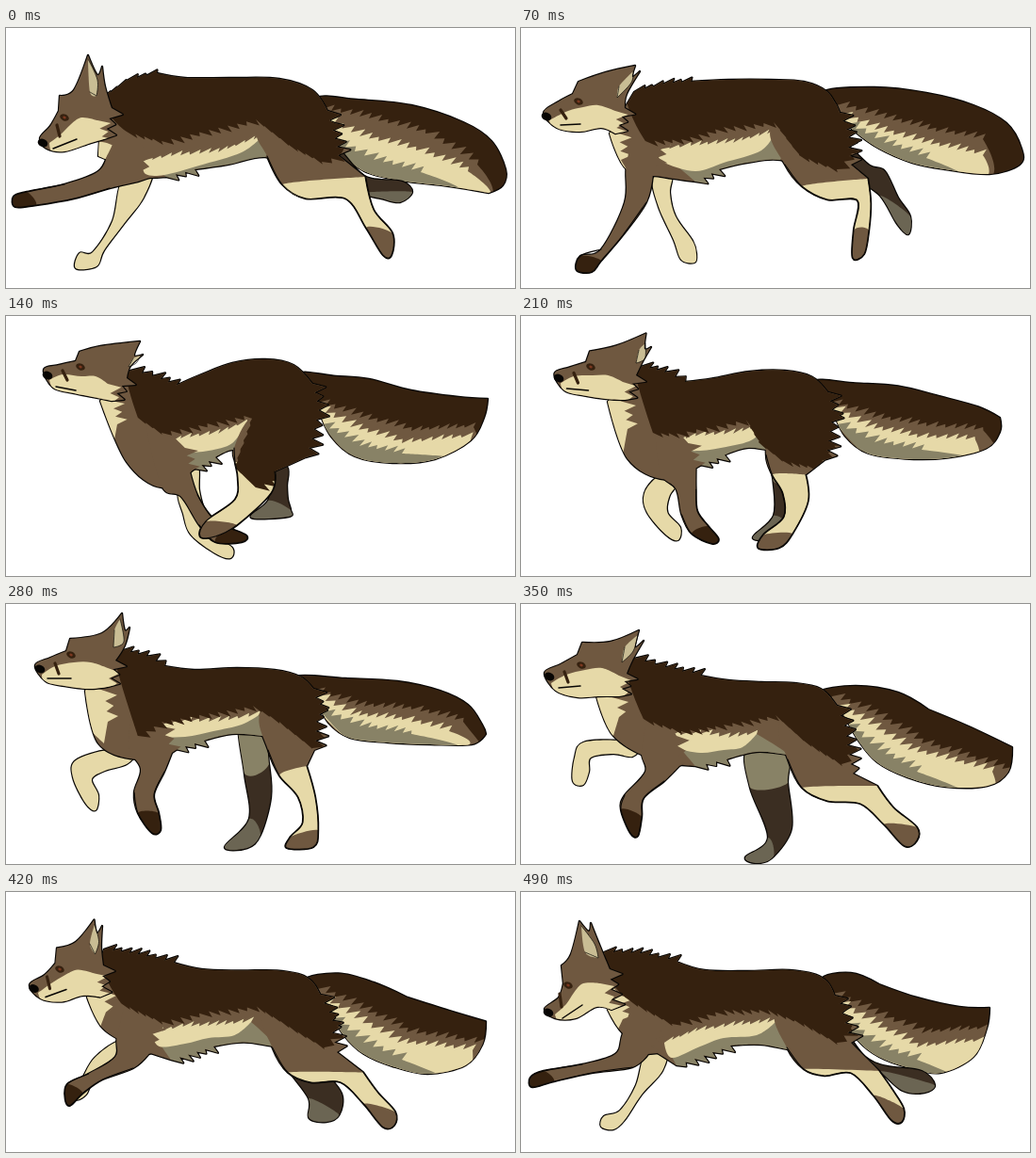
An HTML page with a canvas that plays this animation: 540 px wide and 276 px high, repeating every 560 ms.

```html
<!DOCTYPE html>
<html lang="en">
<head>
<meta charset="utf-8">
<title>Running wolf</title>
<style>
html, body { margin: 0; width: 100%; height: 100%; overflow: hidden; background: #fff; }
canvas { display: block; }
</style>
</head>
<body>
<canvas id="stage" width="540" height="276"></canvas>
<script>
const STEP = 70;
const DARK = '#35210f', MID = '#6f5840', CREAM = '#e6d9a8', GREY = '#888266',
      FAR = '#3b2e22', FAR_PAW = '#6b6553', LINE = '#080604';

// Points are x,y. "!" makes a corner, "~" puts fur on the stretch that leads there.
const stretch = {
  tail: '330,74 372,76 430,82 485,100 515,120 530,150 527,167 512,175! 470,168 420,162 380,152 355,130 338,100',
  tailMid: '335,86 385,96~ 445,112~ 500,145~ 513,180 420,190 335,140',
  tailLight: '338,98 375,115~ 435,130~ 490,152~ 512,178 420,175 345,125',
  tailShade: '350,122! 390,140~ 440,153~ 480,172 385,172',
  farHind: '345,120 372,150 388,160 420,163 431,174 418,185 398,181 378,175 350,150',
  farFore: '155,150 146,180 125,208 104,236 96,253 74,255 78,239 92,238 113,205 124,160',
  torso: '102,75 128,56~ 160,48~ 190,53 240,53 290,54 325,66 341,88 345,118~ 310,150 275,137 235,145 200,150 170,158~ 140,158 118,145 98,136!',
  belly: '145,142! 175,136~ 225,132~ 272,115~ 250,132 205,146 168,156 148,155',
  saddle: '355,135 335,142~ 300,124~ 265,97~ 215,108~ 165,120~ 128,110~ 104,80',
  chest: '97,120! 107,122 108,134~ 104,142! 94,136',
  hind: '325,75 344,100 352,135~ 381,158! 390,193 410,218 409,241 400,241 382,212 360,181 318,181 293,166 277,136 268,105',
  fore: '125,105 148,130 140,163~ 110,170 72,181 32,188 10,190 8,179 22,174 62,166 98,152 110,130',
  head: '36,117 47,104 56,88! 57,72! 72,66 87,29! 97,50 102,41! 105,62 112,85 104,118~ 90,122 62,131 43,128',
  cheek: '46,122! 58,113 68,103 80,95 97,98 104,124~ 80,138 52,136',
  ear: '87,33! 97,55 96,72! 89,68',
  face: '39,122 62,95 50,128 75,118 54,103 57,115'
};
const land = {
  tail: '320,68 375,63 430,69 480,82 515,101 531,128 529,145 497,155 450,150 415,143 380,128 352,108 338,92',
  tailMid: '335,82 385,96~ 440,110~ 490,118~ 497,160 400,170 335,120',
  tailLight: '338,92 375,108~ 425,122~ 490,135~ 490,160 400,160 340,110',
  tailShade: '345,102! 385,122~ 430,138~ 470,158 380,150',
  farHind: '345,125 370,146 386,152 400,180 413,200 411,219 399,208 381,178 352,155',
  farFore: '160,155 158,175 164,200 182,226 186,240 184,249 170,246 162,225 146,190 140,160',
  torso: '120,68 150,60~ 180,57~ 220,55 265,55 300,57 325,68 338,90 348,125~ 320,155 275,140 240,143 210,150 185,163~ 150,158 112,150 94,112!',
  belly: '146,130! 180,125~ 225,122~ 270,110~ 255,130 215,143 185,152 150,142',
  saddle: '358,125 335,150~ 295,135~ 268,100~ 215,105~ 170,118~ 132,120~ 112,78',
  chest: '95,105! 104,112 106,140~ 112,150! 92,140',
  hind: '325,75 340,100 350,145~ 368,160! 371,186 369,215 364,240 352,244 353,215 357,183 325,182 298,168 280,145 266,105',
  fore: '125,100 150,120 140,155~ 133,185 108,220 85,247 75,259 59,257 63,242 85,235 110,185 112,145',
  head: '24,90 40,78 55,70! 61,57! 90,47 121,40! 118,52 126,46! 112,70 110,85 100,112~ 85,106 62,110 38,106',
  cheek: '30,98! 50,88 66,84 82,82 100,88 102,115~ 75,120 40,114',
  ear: '119,46! 117,58 102,74! 104,62',
  face: '27,94 61,78 42,103 63,102 42,87 48,96'
};
const gather = {
  tail: '310,62 350,64 385,67 430,79 480,86 511,88! 507,108 493,132 455,152 410,156 370,149 345,128 330,98',
  tailMid: '330,92 375,108~ 430,122~ 496,118~ 500,165 400,175 330,120',
  tailLight: '330,98 365,118~ 420,135~ 494,128~ 470,165 400,165 335,115',
  tailShade: '335,115! 375,138~ 420,146~ 480,152 390,165',
  farHind: '275,150 298,160 298,180 299,195 302,206 300,213 260,214 278,196 282,170',
  farFore: '203,160 205,185 210,205 220,232 240,246 238,257 222,252 196,232 188,210 183,185',
  torso: '132,58 155,64~ 180,74~ 205,63 240,50 275,46 305,52 325,72 331,100~ 300,140 262,145 240,142 222,150 200,162~ 165,182 128,155 100,90!',
  belly: '160,138! 185,130~ 225,125~ 256,112~ 240,135 215,143 190,145 165,143',
  saddle: '340,130 300,168~ 265,182~ 242,160~ 262,104~ 165,124~ 140,108~ 128,68',
  chest: '100,84! 112,90 118,115~ 112,148! 97,112',
  hind: '318,72 331,100 318,150~ 285,165! 281,188 245,222 222,234 206,234 212,218 243,195 246,172 243,155 242,140 262,105',
  fore: '150,110 190,140 195,165~ 203,190 217,212 235,224 255,233 250,240 222,240 205,222 186,192 165,180',
  head: '40,57 56,52 74,48! 78,38! 100,32 142,27! 136,42 145,41! 132,53 128,66 112,90~ 92,86 72,82 50,76',
  cheek: '46,68! 60,62 80,64 95,64 108,72 113,92~ 85,92 55,84',
  ear: '143,42! 138,50 130,54! 135,45',
  face: '44,63 79,54 53,75 74,79 60,58 65,68'
};
const stand = {
  tail: '308,77 360,79 415,82 460,92 490,107 505,128 509,138! 494,149 450,149 405,147 365,142 342,126 328,100',
  tailMid: '325,92 370,108~ 430,112~ 485,125~ 505,150! 400,170 330,120',
  tailLight: '330,98 365,118~ 420,123~ 470,135~ 490,150 400,165 335,118',
  tailShade: '335,115! 375,130~ 430,138~ 480,152 390,160',
  farHind: '247,125 272,130 279,170 281,205 270,245 256,259 232,258 258,228 253,180',
  farFore: '136,158 128,170 105,177 91,186 98,203 95,219 84,211 71,184 74,166 108,155',
  torso: '122,50 148,56~ 168,66~ 200,70 245,68 285,70 312,77 326,90 330,118~ 305,145 272,140 240,138 210,145 180,154~ 140,165 98,148 84,92!',
  belly: '152,132! 185,125~ 225,125~ 268,118~ 250,128 220,135 190,141 160,140',
  saddle: '338,130 325,153~ 290,125~ 262,108~ 215,116~ 165,125~ 140,140~ 116,62',
  chest: '86,86! 104,92 108,125~ 104,148! 80,120',
  hind: '312,80 329,105 327,155~ 319,172! 328,205 331,240 326,258 298,259 302,247 315,232 310,205 290,182 278,155 270,115',
  fore: '140,105 165,130 176,158~ 168,178 157,202 162,222 164,240 155,243 140,222 136,200 143,175 130,150',
  head: '31,65 47,57 64,50! 68,37! 102,31 123,10! 126,28 131,25! 126,44 116,60 108,88~ 88,90 62,87 42,82',
  cheek: '38,75! 52,66 72,62 90,62 108,68 110,90~ 80,95 45,90',
  ear: '121,16! 125,40 114,46! 115,28',
  face: '36,69 69,54 44,79 69,79 52,63 56,74'
};
const push = {
  tail: '315,94 355,87 400,94 432,112! 475,130 521,152! 517,178 495,193 450,194 410,184 378,168 358,145 338,112',
  tailMid: '330,98 375,118~ 425,148~ 520,178~ 500,205 400,205 335,125',
  tailLight: '335,108 368,128~ 410,155~ 500,178~ 495,205 400,200 345,130',
  tailShade: '345,128! 378,155~ 420,178~ 470,200 380,190',
  farHind: '240,155 282,160 283,190 287,238 268,268 252,275 238,269 262,248 243,195',
  farFore: '125,152 118,162 98,159 74,163 72,178 66,192 55,188 57,163 66,147 105,145',
  torso: '120,58 152,68~ 190,76~ 220,81 255,83 290,84 318,90 335,108 345,140~ 320,165 283,160 250,157 218,165 185,172~ 140,165 98,140 80,98!',
  belly: '158,140! 190,138~ 220,142~ 250,138~ 235,152 215,155 190,158 165,152',
  saddle: '352,150 340,170~ 300,145~ 270,118~ 215,128~ 170,135~ 130,122~ 112,74',
  chest: '82,95! 100,100 104,120~ 98,140! 78,118',
  hind: '318,92 338,120 352,180~ 378,193! 395,216 420,237 420,251 407,257 385,234 360,212 325,209 298,195 283,165 275,125',
  fore: '140,110 165,140 168,172~ 152,188 130,206 128,226 124,246 116,243 106,218 110,203 132,178 128,155',
  head: '25,73 42,64 60,54! 65,41! 95,40 125,28! 121,46 130,39! 118,60 112,74 104,98~ 82,98 60,99 37,92',
  cheek: '32,84! 48,75 68,70 86,68 104,76 106,100~ 78,106 42,100',
  ear: '124,33! 119,50 107,62! 110,46',
  face: '30,77 64,65 40,89 63,87 46,72 50,83'
};
const leap = {
  tail: '318,94 350,86 380,98! 420,112 465,122 497,123! 494,145 480,175 445,192 410,186 380,175 358,158 340,130',
  tailMid: '330,108 375,130~ 425,150~ 494,145~ 490,195 400,200 335,140',
  tailLight: '335,118 370,140~ 420,165~ 490,158~ 470,200 400,200 345,145',
  tailShade: '345,140! 380,165~ 420,178~ 465,200 380,195',
  farHind: '345,150 365,175 388,185 425,190 439,205 428,213 405,211 380,190 350,172',
  farFore: '155,165 150,190 128,215 110,242 98,252 85,249 88,238 105,232 122,205 132,172',
  torso: '88,64 125,66~ 165,74~ 195,83 240,84 285,83 318,90 332,110 345,150~ 320,170 288,168 255,162 222,163 165,184~ 135,165 108,150 92,125!',
  belly: '152,160! 185,148~ 225,142~ 270,138~ 250,152 215,155 190,164 160,176',
  saddle: '350,145 335,160~ 300,140~ 262,125~ 215,125~ 160,140~ 115,115~ 92,85',
  chest: '92,95! 106,110 108,135~ 100,152! 88,130',
  hind: '318,92 335,118 350,160~ 380,190! 394,210 406,230 404,244 393,242 374,216 350,192 322,195 300,188 282,165 270,125',
  fore: '125,110 150,140 135,172~ 118,186 75,192 35,201 12,207 10,197 24,190 65,183 100,172 108,150',
  head: '25,124 40,112 45,97! 43,78! 53,66 62,31! 72,42 74,33! 84,58 94,82 96,125~ 80,122 58,134 36,134',
  cheek: '36,130! 48,119 56,107 66,97 84,97 98,128~ 76,138 45,142',
  ear: '64,36! 78,55 82,70! 68,64',
  face: '29,128 50,99 44,134 65,120 41,108 43,122'
};

const mapValues = (o, fn) => Object.fromEntries(Object.entries(o).map(([k, v]) => [k, fn(v, k)]));
const parse = text => text.split(' ').map(s => {
  const [x, y] = s.split(',').map(parseFloat);
  return { x, y, fur: s.endsWith('~'), sharp: /[!~]$/.test(s) };
});
const between = (a, b) => mapValues(a, (pts, k) => pts.map((p, i) =>
  ({ ...p, x: (p.x + b[k][i].x) / 2, y: (p.y + b[k][i].y) / 2 })));

const [p0, p1, p2, p3, p4, p5] = [stretch, land, gather, stand, push, leap].map(p => mapValues(p, parse));
const poses = [p0, p1, p2, between(p2, p3), p3, p4, between(p4, p5), p5];

function addFur(path, a, b) {
  const dx = b.x - a.x, dy = b.y - a.y, len = Math.hypot(dx, dy);
  const n = Math.max(1, Math.round(len / 10));
  for (let k = 0; k < n; k++) {
    const h = 3 + 3 * Math.abs(Math.sin(k * 2.3 + 1)), mid = (k + .5) / n, end = (k + 1) / n;
    path.lineTo(a.x + dx * mid + dy / len * h + h * 1.4, a.y + dy * mid - dx / len * h);
    path.lineTo(a.x + dx * end, a.y + dy * end);
  }
}

// Smooth curve through the points, with corners and fur where marked.
function trace(pts, closed = true) {
  const path = new Path2D(), n = pts.length;
  const at = i => closed ? pts[(i + n) % n] : pts[Math.max(0, Math.min(n - 1, i))];
  const pull = i => {
    if (at(i).sharp || at(i + 1).fur) return { x: 0, y: 0 };
    return { x: (at(i + 1).x - at(i - 1).x) / 6, y: (at(i + 1).y - at(i - 1).y) / 6 };
  };
  path.moveTo(pts[0].x, pts[0].y);
  for (let i = 0; i < (closed ? n : n - 1); i++) {
    const a = at(i), b = at(i + 1), u = pull(i), v = pull(i + 1);
    if (b.fur) addFur(path, a, b);
    else path.bezierCurveTo(a.x + u.x, a.y + u.y, b.x - v.x, b.y - v.y, b.x, b.y);
  }
  if (closed) path.closePath();
  return path;
}

const ctx = document.getElementById('stage').getContext('2d');

function fill(shape, color) {
  ctx.fillStyle = color;
  ctx.fill(shape instanceof Path2D ? shape : trace(shape));
}
function ink(path, width, color = LINE) {
  ctx.strokeStyle = color;
  ctx.lineWidth = width;
  ctx.stroke(path);
}
// Outlined shape with patches of colour kept inside it.
function piece(outline, color, ...patches) {
  const path = trace(outline);
  ink(path, 2.4);
  fill(path, color);
  inside(path, () => patches.forEach(([pts, c]) => fill(pts, c)));
}
function inside(path, draw) {
  ctx.save();
  ctx.clip(path);
  draw();
  ctx.restore();
}
function dot({ x, y }, rx, ry, color) {
  ctx.fillStyle = color;
  ctx.beginPath();
  ctx.ellipse(x, y, rx, ry, .4, 0, 7);
  ctx.fill();
}

function drawBody(p) {
  const torso = trace(p.torso), hind = trace(p.hind), fore = trace(p.fore);
  const body = new Path2D();
  [torso, hind, fore].forEach(part => { body.addPath(part); ink(part, 2.4); });
  fill(torso, MID);
  inside(torso, () => {
    fill([...p.belly.slice(0, 4), ...p.torso.slice(10, 14)], GREY);
    fill(p.belly, CREAM);
    fill(p.chest, CREAM);
  });
  fill(fore, MID);
  inside(fore, () => fill(p.fore.slice(5, 9), DARK));
  ink(trace(p.fore.slice(3, 10), false), 1.1);
  fill(hind, MID);
  inside(hind, () => {
    fill(p.hind.slice(3, 12), CREAM);
    fill(p.hind.slice(5, 9), MID);
  });
  const nape = p.saddle[7].x;
  inside(body, () => fill([{ x: nape - 10, y: 0, sharp: true }, { x: 430, y: 0, sharp: true }, ...p.saddle], DARK));
  ink(trace(p.hind.slice(3, 13), false), 1.1);
}

function drawHead(p) {
  const [nose, eye, lip, corner, markTop, markEnd] = p.face;
  piece(p.head, MID, [p.cheek, CREAM], [p.ear, '#c9bd94']);
  ink(trace(p.ear, false), .7);
  ink(trace([markTop, markEnd], false), 3.2, DARK);
  ink(trace([lip, corner], false), 1.5);
  dot(eye, 5, 3.4, DARK);
  dot(eye, 1.8, 1.3, '#7b3820');
  dot(nose, 5.5, 4.2, LINE);
}

function draw(p) {
  ctx.fillStyle = '#fff';
  ctx.fillRect(0, 0, 540, 276);
  piece(p.tail, DARK, [p.tailMid, MID], [p.tailLight, CREAM], [p.tailShade, GREY]);
  const leg = p.farHind, patches = [[leg.slice(4, 8), FAR_PAW]];
  if (leg[5].x < 280) patches.push([[leg[0], leg[1], leg[2], leg[8]], GREY]);
  piece(leg, FAR, ...patches);
  piece(p.farFore, CREAM);
  drawBody(p);
  drawHead(p);
}

ctx.lineJoin = ctx.lineCap = 'round';
let shown = -1;
const start = performance.now();
function tick() {
  const i = Math.floor((performance.now() - start) / STEP) % poses.length;
  if (i !== shown) draw(poses[shown = i]);
  requestAnimationFrame(tick);
}
tick();
</script>
</body>
</html>
```
